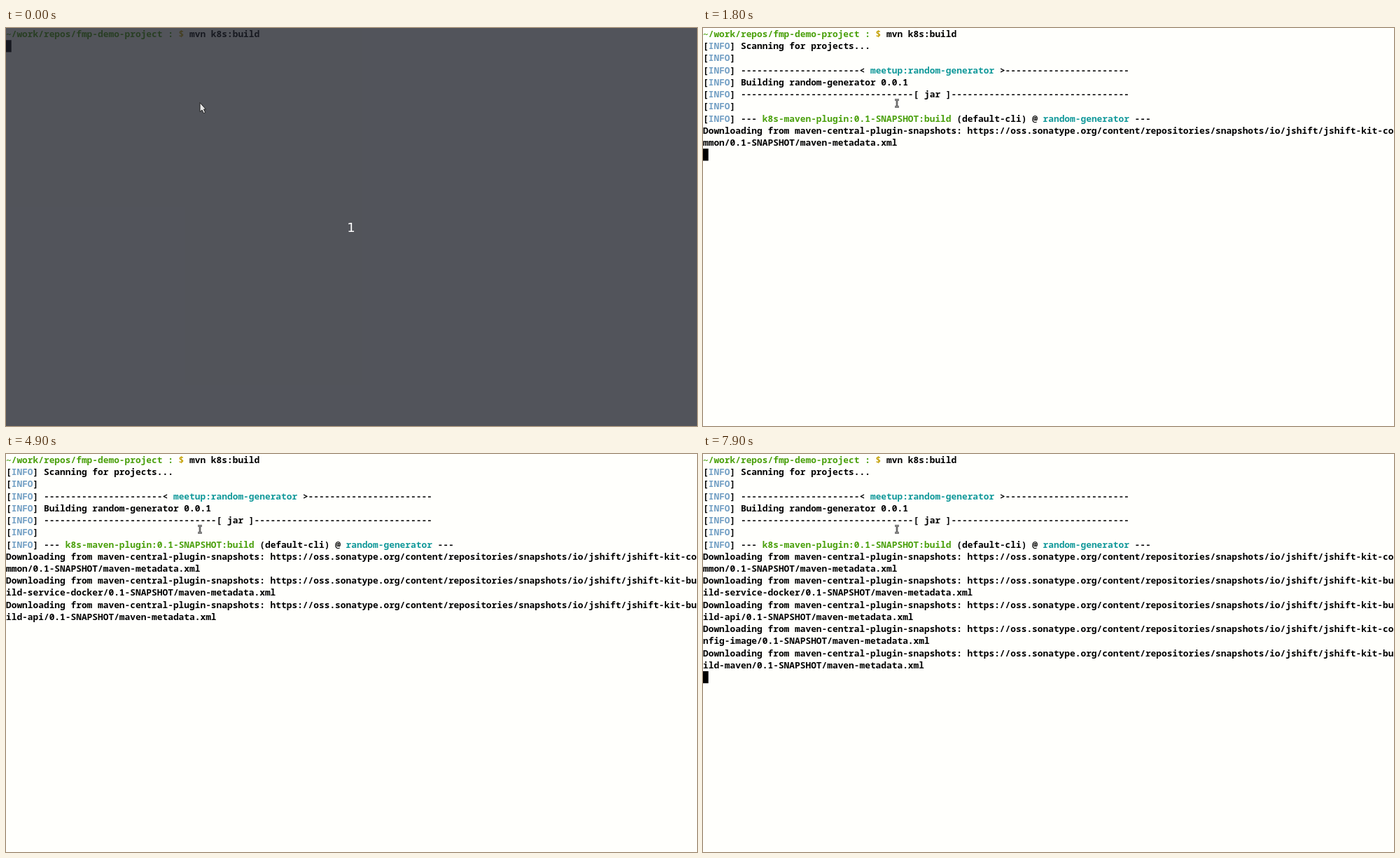
These frames come from a looping animation (987x568 px, 8 s). An HTML page:

```html
<!DOCTYPE html>
<html lang="en">
<head>
<meta charset="utf-8">
<title>Terminal build</title>
<style>
  html, body { margin: 0; width: 100%; height: 100%; overflow: hidden; background: #fffffc; }
  #stage { position: relative; width: 987px; height: 568px; overflow: hidden; }
  #stage > * { position: absolute; }
  .row {
    left: 0; height: 17.22px; white-space: pre; color: #000;
    font: 600 12.852px/17.22px "Noto Sans Mono", monospace;
    font-variant-ligatures: none;
  }
  .green { color: #4aa00c; }
  .gold { color: #c4a000; }
  .blue { color: #729fc4; }
  .teal { color: #12999a; }
  svg { left: 0; top: 0; }
</style>
</head>
<body>
<div id="stage">
  <svg id="screen" width="987" height="568">
    <rect id="caret" width="7.71" height="17.22"/>
    <rect id="shade" width="987" height="568" fill="rgba(30, 33, 42, .77)"/>
    <g id="countdown">
      <text x="493" y="290.5" text-anchor="middle" fill="#fff" font-size="18" font-family="'DejaVu Sans', sans-serif">1</text>
      <path d="M277 106.5V119.5L280 117L282.3 121.7L284.7 120.5L282.5 116H285.5Z" fill="#e4e4e4" stroke="#1c1c1c"/>
    </g>
    <g id="beam" fill="none">
      <path d="M274 102.5H280M274 112.5H280M277 102.5V112.5" stroke="#444" stroke-width="2.6"/>
      <path d="M274 102.5H280M274 112.5H280M277 102.5V112.5" stroke="#aaa" stroke-width=".8"/>
    </g>
  </svg>
</div>
<script>
const LOOP = 8000, LINE = 17.22, COLUMNS = 128;
const byId = id => document.getElementById(id);
const stage = byId("stage"), screenLayer = byId("screen"), caret = byId("caret");

const paint = (color, text) => `<span class="${color}">${text}</span>`;
const info = (text = "") => `[${paint("blue", "INFO")}] ${text}`;
const dash = count => "-".repeat(count);

function download(module) {
  const line = "Downloading from maven-central-plugin-snapshots: " +
    "https://oss.sonatype.org/content/repositories/snapshots/io/jshift/" +
    `jshift-kit-${module}/0.1-SNAPSHOT/maven-metadata.xml`;
  return [line.slice(0, COLUMNS), line.slice(COLUMNS)];
}

const lines = [
  paint("green", "~/work/repos/fmp-demo-project : ") + paint("gold", "$") + " mvn k8s:build",
  info("Scanning for projects..."),
  info(),
  info(`${dash(22)}&lt; ${paint("teal", "meetup:random-generator")} &gt;${dash(23)}`),
  info("Building random-generator 0.0.1"),
  info(`${dash(32)}[ jar ]${dash(33)}`),
  info(),
  info(`--- ${paint("green", "k8s-maven-plugin:0.1-SNAPSHOT:build")} (default-cli) @ ${paint("teal", "random-generator")} ---`),
  ...["common", "build-service-docker", "build-api", "config-image", "build-maven"].flatMap(download)
];

const rows = lines.map((html, i) => {
  const row = document.createElement("div");
  row.className = "row";
  row.style.top = `${i * LINE}px`;
  row.innerHTML = html;
  stage.insertBefore(row, screenLayer);
  return row;
});

// [time, number of printed rows]
const output = [[0, 1], [400, 2], [800, 6], [1000, 8], [1300, 10], [3600, 12], [4900, 14], [6100, 16], [7300, 18]];
// The caret starts lit and flips at each time.
const blinks = [300, 600, 1200, 1800, 2500, 3100, 3900, 4200, 4900, 5500, 6100, 6700, 7300, 7900];

const show = (element, visible) => { element.style.visibility = visible ? "visible" : "hidden"; };

function render(time) {
  const printed = output.filter(([start]) => start <= time).pop()[1];
  const counting = time < 300;
  rows.forEach((row, i) => show(row, i < printed));
  caret.setAttribute("y", printed * LINE);
  show(caret, blinks.filter(flip => flip <= time).length % 2 === 0);
  show(byId("shade"), counting);
  show(byId("countdown"), counting);
  show(byId("beam"), !counting);
}

const begin = performance.now();
function tick() {
  render((performance.now() - begin) % LOOP);
  requestAnimationFrame(tick);
}
tick();
</script>
</body>
</html>
```
